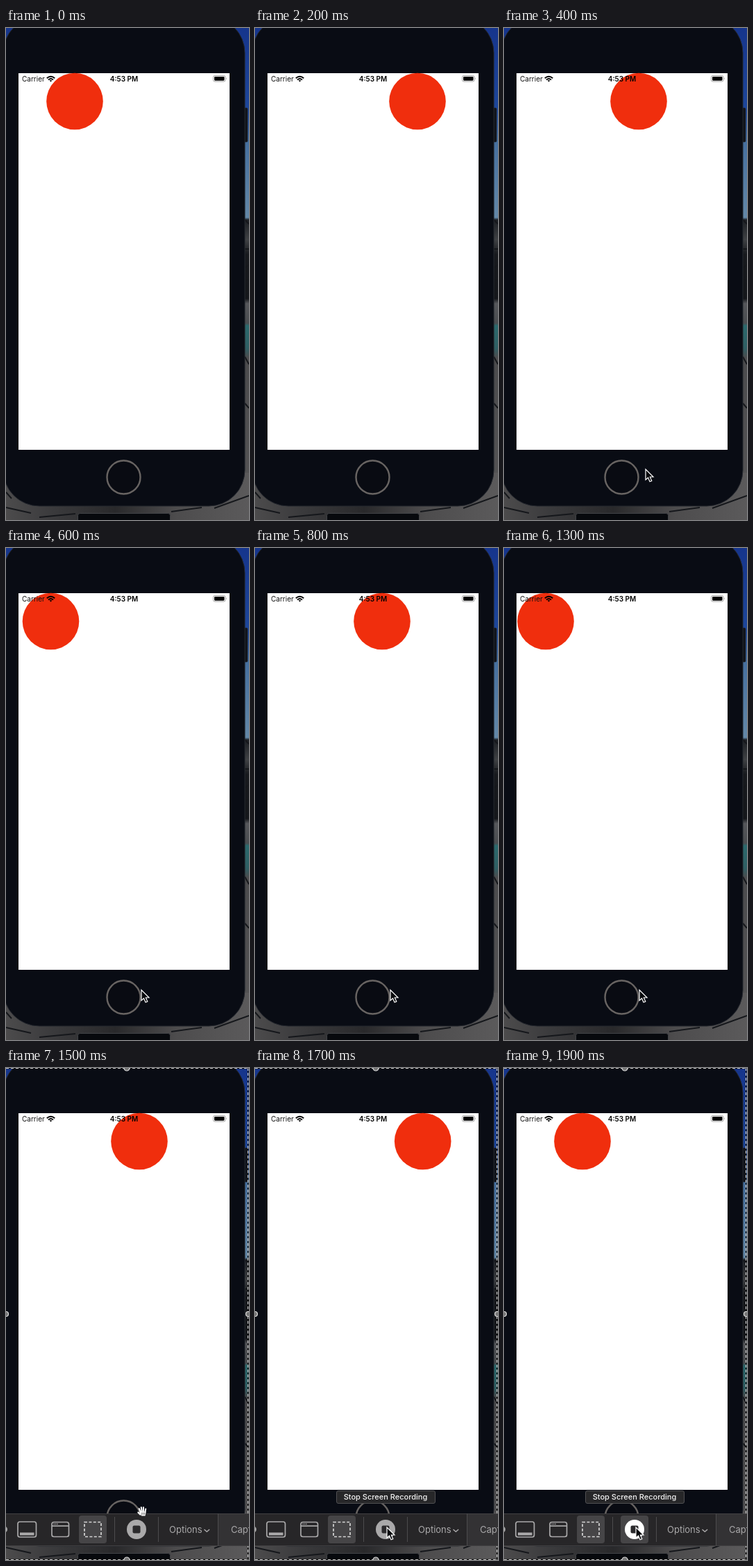
Write an HTML page that moves like this. It is 350 px wide and 708 px high and loops after 2000 ms.

```html
<!DOCTYPE html>
<html lang="en">
<head>
<meta charset="utf-8">
<title>Bouncing circle</title>
<style>
  html, body { margin: 0; width: 100%; height: 100%; overflow: hidden; background: #000; }
  svg { display: block; width: 350px; height: 708px; font-family: Inter, "Liberation Sans", sans-serif; }
</style>
</head>
<body>
<svg viewBox="0 0 350 708">
  <defs>
    <linearGradient id="sky" x2="0" y2="1">
      <stop offset="0" stop-color="#16358c"/>
      <stop offset=".16" stop-color="#1d469a"/>
      <stop offset=".23" stop-color="#456f9f"/>
      <stop offset=".385" stop-color="#6388a8"/>
      <stop offset=".39" stop-color="#1c1f24"/>
      <stop offset=".43" stop-color="#3f4144"/>
      <stop offset=".46" stop-color="#17191d"/>
      <stop offset=".55" stop-color="#14161a"/>
      <stop offset=".56" stop-color="#55565a"/>
      <stop offset=".6" stop-color="#4a4d50"/>
      <stop offset=".605" stop-color="#2b696d"/>
      <stop offset=".65" stop-color="#2f5f64"/>
      <stop offset=".67" stop-color="#4b4b4d"/>
      <stop offset="1" stop-color="#565556"/>
    </linearGradient>
    <linearGradient id="ground">
      <stop offset="0" stop-color="#4c4b4c"/>
      <stop offset=".2" stop-color="#3a3a3c"/>
      <stop offset=".45" stop-color="#29292b"/>
      <stop offset=".7" stop-color="#4d4c4d"/>
      <stop offset="1" stop-color="#5b5a5b"/>
    </linearGradient>
  </defs>

  <!-- wallpaper -->
  <rect width="350" height="708" fill="url(#sky)"/>
  <rect y="640" width="350" height="68" fill="url(#ground)"/>
  <path d="M344 276l6 6M344 318h6M344 345l6-4M344 380h6M344 473l6 11M344 540l6 7M300 691l50-18M238 696l44-6M0 668l8 9M0 690l36 8M48 704l52-5"
        stroke="#15171b" stroke-width="2" fill="none"/>

  <!-- phone -->
  <rect x="342" y="115" width="6" height="49" rx="1.5" fill="#11141b" stroke="#24272d" stroke-width=".6"/>
  <rect x="-4" y="-16" width="348" height="704" rx="52" fill="#090c14" stroke="#25282f"/>
  <rect x="103.5" y="698.5" width="133" height="16" rx="3" fill="#07090d" stroke="#414347"/>
  <circle cx="169.5" cy="646.5" r="24" fill="#090b12" stroke="#686462" stroke-width="2.4"/>
  <rect x="18" y="65" width="304" height="542" fill="#fff"/>
  <circle id="ball" cy="105.5" r="40.8" fill="#f02e0d"/>

  <!-- status bar -->
  <text x="23" y="77" font-size="10" fill="#111">Carrier</text>
  <g fill="none" stroke="#000" stroke-width="1.9">
    <path d="M58.8 72.3Q64.5 67.2 70.2 72.3M61 74.6Q64.5 71.5 68 74.6"/>
    <path d="M64.5 77.6l-1.9-2q1.9-1.3 3.8 0z" fill="#000" stroke="none"/>
  </g>
  <text x="170" y="77" font-size="10" font-weight="600" text-anchor="middle">4:53 PM</text>
  <rect x="298.5" y="68.5" width="17.5" height="8.6" rx="2.3" fill="none" stroke="#999" stroke-width=".9"/>
  <rect x="300" y="70" width="14.5" height="5.7" rx="1.1"/>
  <path d="M317 71.3q1.6 1.5 0 3z" fill="#999"/>

  <!-- screen capture controls -->
  <g id="capture">
    <path d="M0 .5H350M348.5 0V708M0 707.5H350" stroke="#111" stroke-width="1.4"/>
    <path d="M0 .5H350M348.5 0V708M0 707.5H350" stroke="#c8c8c8" stroke-width="1.2" stroke-dasharray="4 3"/>
    <rect y="641" width="350" height="47" fill="#272628"/>
    <rect x="305" y="641" width="45" height="47" fill="#333234"/>
    <path d="M0 641.5H350M0 687.5H350" stroke="#424143"/>
    <path d="M156.5 646V682M219.5 646V682M305.5 641V688" stroke="#4c4b4d"/>
    <g fill="#777" stroke="#ddd" stroke-width="1.2">
      <circle cx="174" r="4"/><circle cx="174" cy="708" r="4"/>
      <circle cy="354" r="3.5"/><circle cx="349" cy="354" r="3.5"/>
    </g>
    <circle cx="-3" cy="664" r="5" fill="#aaa"/>
    <rect x="105" y="644" width="40" height="40" rx="4" fill="#464547"/>
    <g fill="none" stroke="#aaa9aa" stroke-width="1.7">
      <rect x="17" y="653" width="26.5" height="22" rx="3"/>
      <rect x="66" y="653.5" width="24.5" height="21" rx="3"/>
      <path d="M66 659H90.5"/>
      <path d="M68.5 656.3H75" stroke-dasharray="1.4 1" stroke-width="1.4"/>
      <path d="M20 670.5H40.5" stroke-width="4"/>
      <rect x="113" y="653.5" width="24" height="21" stroke="#d5d5d5" stroke-dasharray="4 2.4"/>
      <path d="M285.5 664l3.8 3.2 3.8-3.2" stroke-width="1.5"/>
    </g>
    <rect id="pressed" x="168" y="644" width="40" height="40" rx="4" fill="#464547"/>
    <circle id="stop" cx="188" cy="664" r="14"/>
    <rect x="182.5" y="658.5" width="11" height="11" rx="2" fill="#2b2a2c"/>
    <g font-size="13" fill="#aaa9aa">
      <text x="235" y="669">Options</text>
      <text x="324" y="669">Capture</text>
    </g>
  </g>
  <g id="tooltip">
    <rect x="117.5" y="608.5" width="142" height="18" rx="2.5" fill="#272729" stroke="#505052"/>
    <text x="188" y="621.3" font-size="11" font-weight="500" fill="#f2f2f2" text-anchor="middle">Stop Screen Recording</text>
  </g>

  <!-- pointers -->
  <path id="arrow" d="M0 0V15.2L3.5 12 6 17.8 8.8 16.6 6.3 11H11Z" fill="#08090c" stroke="#fff" stroke-width="1.2"/>
  <g id="hand" fill="none" stroke-linecap="round">
    <g id="fingers" stroke="#fff" stroke-width="2.1">
      <path d="M191.8 634.2l2 5M194.8 632.2l.8 6M198 632.4l-.2 6M201.2 634.6l-1 5M190.3 639.6l3 3"/>
      <path d="M193 639H201L200 644H195.5Z" fill="#fff" stroke-width="1.2"/>
    </g>
    <path d="M195.7 640v2.5M197.7 640v2.5M199.6 640v2.5" stroke="#111" stroke-width=".6"/>
  </g>
</svg>
<script>
  const LOOP = 2000, STEP = 100;
  const LEFT = 59, TRAVEL = 222.5;
  const el = id => document.getElementById(id);
  const show = (id, on) => el(id).style.display = on ? "" : "none";

  // [time, distance travelled], before folding between the two walls
  const path = [[0, -850], [400, -580], [800, -321], [1100, -124], [1300, 1], [1500, 133], [1800, 327], [1900, 391]];
  const pointer = [[300, 204, 635], [400, 204, 635], [600, 195, 636], [1500, 195, 636], [1700, 190, 661], [1900, 190, 661]];

  function sample(keys, t, column = 1) {
    const next = keys.findIndex(key => key[0] >= t);
    if (next <= 0) return keys[0][column];
    const a = keys[next - 1], b = keys[next];
    return a[column] + (b[column] - a[column]) * (t - a[0]) / (b[0] - a[0]);
  }

  function fold(distance) {
    const period = 2 * TRAVEL;
    const d = (distance % period + period) % period;
    return LEFT + Math.min(d, period - d);
  }

  function draw(t) {
    const capturing = t >= 1400, grabbing = capturing && t < 1600, pressed = t >= 1900;
    el("ball").setAttribute("cx", fold(sample(path, t)));
    show("capture", capturing);
    show("tooltip", t >= 1700);
    show("pressed", pressed);
    el("stop").setAttribute("fill", pressed ? "#fff" : "#aaa9aa");
    show("hand", grabbing);
    show("arrow", t >= 300 && !grabbing);
    el("arrow").setAttribute("transform", `translate(${sample(pointer, t)} ${sample(pointer, t, 2)})`);
  }

  const start = performance.now();
  function tick() {
    const t = (performance.now() - start) % LOOP;
    draw(Math.floor(t / STEP) * STEP);
    requestAnimationFrame(tick);
  }
  tick();
</script>
</body>
</html>
```
